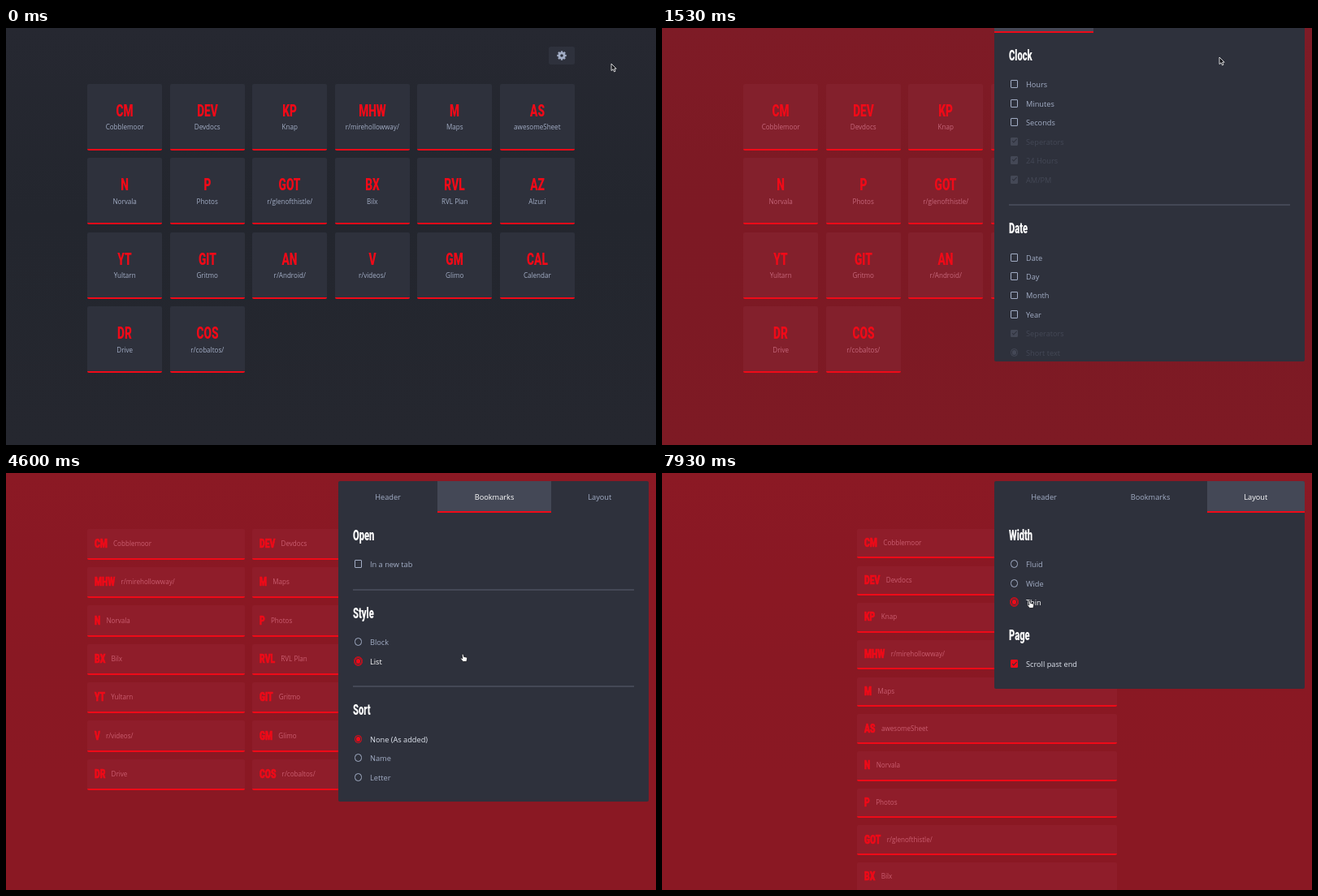
Recreate the animation shown at these times as an HTML page. Size 800 by 514 pixels, loop 8 s.

```html
<!DOCTYPE html>
<html lang="en">
<head>
<meta charset="utf-8">
<title>Start page settings</title>
<style>
:root { --red: #f00a18; --panel: #2e313c; --line: #444856; --text: #a3aec6; }
html, body { margin: 0; width: 100%; height: 100%; overflow: hidden; }
body {
  position: relative; background: linear-gradient(#262831, #23262e 45%, #25272f);
  color: var(--text); font: 9.23px/14px "Open Sans", "Noto Sans", sans-serif; cursor: default;
}
body * { position: absolute; white-space: nowrap; }
#stage { left: 0; top: 0; width: 800px; height: 514px; overflow: hidden; }
.tile { background: var(--panel); border-bottom: 2px solid var(--red); border-radius: 2px; }
.code, h2 { font-family: Roboto, "Liberation Sans", sans-serif; font-weight: 800; }
.code {
  left: 50%; top: 33px; color: var(--red); font-size: 20.5px; line-height: 24px;
  transform: translate(-50%, -50%) scaleX(.67);
}
.label { left: 50%; top: 53.5px; font-size: 8.08px; transform: translate(-50%, -50%); }
.list .code {
  left: 9.2px; top: 50%; font-size: 15.4px; -webkit-text-stroke: .7px var(--red);
  transform-origin: 0 50%; transform: translateY(-50%) scaleX(.67);
}
.list .label { left: var(--after); top: 50%; transform: translateY(-50%); }
#gear { left: 668px; top: 23px; width: 32px; height: 22px; background: var(--panel); border-radius: 2px; }
#gear.hover { background: #383c49; }
#gear svg { left: 10px; top: 5px; }
#shade { inset: 0; background: var(--red); }
#panel { left: 409px; top: 10px; width: 381.5px; background: var(--panel); border-radius: 2px; overflow: hidden; }
.tab { top: 0; height: 39px; line-height: 39px; text-align: center; }
.tab.hover { background: #383c49; color: #fff; }
.tab.on { height: 37px; background: var(--line); color: #fff; border-bottom: 2px solid var(--red); }
.page { inset: 0; }
h2 {
  left: 18px; margin: 0; color: #fff; font-size: 18.6px; line-height: 24px;
  transform-origin: 0 50%; transform: translateY(-50%) scaleX(.6);
}
hr { left: 18px; width: 346px; height: 2px; margin: 0; border: 0; background: var(--line); }
.row { left: 18px; width: 325px; height: 23.4px; line-height: 23.4px; padding-left: 21px; }
.row i { left: 1.5px; top: 6.2px; width: 7.8px; height: 7.8px; border: 1.6px solid currentColor; border-radius: 1px; }
.row.radio i { border-radius: 50%; }
.row.on { color: #dfe4ee; }
.row.hover { color: #fff; }
.row.on i { border-color: var(--red); }
.row.off { color: var(--line); }
.row.off i { border-color: var(--line); }
.row.check.on i { background: var(--red); }
.row.check.off i { background: var(--line); }
.row.check.on i::after, .row.check.off i::after {
  content: ""; position: absolute; left: 1px; top: 1.2px; width: 4.6px; height: 2.2px;
  border: solid var(--panel); border-width: 0 0 1.3px 1.3px; transform: rotate(-45deg);
}
.row.radio.on i::after, .row.radio.off i::after {
  content: ""; position: absolute; inset: 1.1px; border-radius: 50%; background: var(--red);
}
.row.radio.off i::after { background: var(--line); }
.row.radio.on.hover i { outline: 1.5px solid #d00c19; }
#cursor { left: 0; top: 0; overflow: visible; }
</style>
</head>
<body>
<div id="stage">
  <div id="grid"></div>
  <div id="gear">
    <svg width="12" height="12" fill="none" stroke="#a3aec6">
      <circle cx="6" cy="6" r="3.2" stroke-width="2.8"/>
      <circle cx="6" cy="6" r="4.8" stroke-width="1.9" pathLength="96" stroke-dasharray="7 5" stroke-dashoffset="3.5"/>
    </svg>
  </div>
  <div id="shade"></div>
  <div id="panel"></div>
  <svg id="cursor" width="12" height="14">
    <path id="arrow" d="M0 0V8.6L2 6.8L3.5 9.9L5 9.2L3.6 6.2H6.2Z" fill="#15161b" stroke="#fff" stroke-width=".8"/>
    <path id="hand" d="M-1 .6Q0-.6 1 .6L1.5 3.4L5 4.2Q6 4.6 5.7 6L4.8 9.5H.6L-2.6 5.8Q-2.6 4.6-1.2 5.2L-.2 5.8Z"
      fill="#fff" stroke="#15161b" stroke-width=".8"/>
  </svg>
</div>
<script>
const LOOP = 8000, STEP = 23.45;
const OPEN = 1800, TO_BOOKMARKS = 2690, TO_LIST = 4466, TO_LAYOUT = 5640, TO_THIN = 7800;
const $ = id => document.getElementById(id);

function add(parent, tag, cls, text = '') {
  const el = document.createElement(tag);
  el.className = cls;
  el.textContent = text;
  parent.append(el);
  return el;
}
function place(el, x, y, w, h) {
  Object.assign(el.style, { left: x + 'px', top: y + 'px', width: w + 'px', height: h + 'px' });
}

const links = `CM Cobblemoor|DEV Devdocs|KP Knap|MHW r/mirehollowway/|M Maps|AS awesomeSheet|
N Norvala|P Photos|GOT r/glenofthistle/|BX Bilx|RVL RVL Plan|AZ Alzuri|YT Yultarn|GIT Gritmo|
AN r/Android/|V r/videos/|GM Glimo|CAL Calendar|DR Drive|COS r/cobaltos/`;
const tiles = links.split('|').map(item => {
  const [, code, label] = item.trim().match(/^(\S+) (.+)$/);
  const el = add($('grid'), 'div', 'tile');
  return { el, code: add(el, 'span', 'code', code), label: add(el, 'span', 'label', label) };
});

const tabs = [['Header', 0, 122], ['Bookmarks', 122, 140], ['Layout', 262, 119.5]].map(([name, x, w]) => {
  const el = add($('panel'), 'div', 'tab', name);
  el.style.left = x + 'px';
  el.style.width = w + 'px';
  return { el, x: x + 409, w };
});

// Row marks: [] check, () radio, + checked, - disabled; "_" is a rule, "#" a heading
const pages = [
  ['#Clock|[] Hours|[] Minutes|[] Seconds|[]- Seperators|[]- 24 Hours|[]- AM/PM|_|' +
   '#Date|[] Date|[] Day|[] Month|[] Year|[]- Seperators|()- Short text', 443.5],
  ['#Open|[] In a new tab|_|#Style|() Block|() List|_|#Sort|()+ None (As added)|() Name|() Letter', 395],
  ['#Width|() Fluid|() Wide|() Thin|#Page|[]+ Scroll past end', 256]
].map(([spec, height]) => {
  const el = add($('panel'), 'div', 'page'), rows = {};
  let y = 27, last = '_';
  for (const item of spec.split('|')) {
    const kind = item[0];
    if (kind === '#') {
      if (y > 27) y += last === '_' ? 29 : 40;
      else y = 67;
      add(el, 'h2', '', item.slice(1)).style.top = y + 'px';
    } else if (kind === '_') {
      y += 31;
      add(el, 'hr', '').style.top = y - 1 + 'px';
    } else {
      y += last === '#' ? 36 : STEP;
      const [, mark, name] = item.match(/^(\S+) (.+)$/);
      const row = add(el, 'div', 'row ' + (kind === '(' ? 'radio' : 'check'), name);
      add(row, 'i', '');
      row.style.top = y - STEP / 2 + 'px';
      row.classList.toggle('on', mark[2] === '+');
      row.classList.toggle('off', mark[2] === '-');
      rows[name] = { el: row, y: y + 10, off: mark[2] === '-' };
    }
    last = kind;
  }
  return { el, height, rows };
});

const clamp = v => Math.min(1, Math.max(0, v));
const smooth = (t, start, span) => { const p = clamp((t - start) / span); return p * p * (3 - 2 * p); };

// Pointer tip: time, x, y
const track = [
  [0, 745, 44], [70, 745, 44], [900, 686, 36], [1780, 686, 36], [2560, 604, 34], [2720, 604, 34],
  [3400, 488, 185], [3650, 488, 185], [4070, 562, 223], [4640, 562, 223], [5070, 698, 66],
  [5400, 728, 32], [5670, 728, 32], [6400, 670, 122], [7270, 462, 158], [7530, 452, 157], [LOOP, 452, 157]
];
function slope(i, axis) {
  const a = track[i - 1], b = track[i], c = track[i + 1];
  if (!a || !c) return 0;
  const before = (b[axis] - a[axis]) / (b[0] - a[0]), after = (c[axis] - b[axis]) / (c[0] - b[0]);
  return before * after > 0 ? 2 * before * after / (before + after) : 0;
}
function pointer(t, axis) {
  const i = Math.max(0, track.findIndex(k => k[0] > t) - 1);
  const a = track[i], b = track[i + 1], span = b[0] - a[0], p = (t - a[0]) / span, q = 1 - p;
  return q * q * (1 + 2 * p) * a[axis] + p * p * (3 - 2 * p) * b[axis]
    + span * p * q * (q * slope(i, axis) - p * slope(i + 1, axis));
}

let layout = '';
function arrange(cols, left, width, height) {
  const key = [cols, height].join();
  if (key === layout) return;
  layout = key;
  const gap = 9.2, w = (width - gap * (cols - 1)) / cols;
  $('grid').className = cols < 6 ? 'list' : '';
  tiles.forEach(({ el, code, label }, i) => {
    place(el, left + i % cols * (w + gap), 68.8 + Math.floor(i / cols) * (height + gap), w, height - 2);
    label.style.setProperty('--after', 16.2 + code.getBoundingClientRect().width + 'px');
  });
}

function render(t) {
  const x = pointer(t, 1), y = pointer(t, 2);
  const current = t < TO_BOOKMARKS ? 0 : t < TO_LAYOUT ? 1 : 2;

  if (t < TO_LIST) arrange(6, 100, 600, 82.2);
  else {
    const left = 1 - clamp((t - TO_LIST) / 182);
    const height = 36.5 + 45.7 * left ** 2.5;
    if (t < TO_THIN) arrange(3, 100, 600, height);
    else arrange(1, 240.3, 319.4, height);
  }

  $('shade').style.opacity = smooth(t, 1148, 486) / 2;
  $('panel').style.transform = `translateY(${-454 * (1 - smooth(t, 1117, 510))}px)`;
  $('panel').style.height = pages[current].height + 'px';
  $('gear').classList.toggle('hover', t < 1200 && x > 668 && x < 700 && y > 23 && y < 45);

  tabs.forEach(({ el, x: left, w }, i) => {
    el.classList.toggle('on', i === current);
    el.classList.toggle('hover', t > OPEN && y > 10 && y < 49 && x > left && x < left + w);
  });

  const { Block, List } = pages[1].rows, { Wide, Thin } = pages[2].rows;
  Block.el.classList.toggle('on', t < TO_LIST);
  List.el.classList.toggle('on', t >= TO_LIST);
  Wide.el.classList.toggle('on', t < TO_THIN);
  Thin.el.classList.toggle('on', t >= TO_THIN);

  let over = false;
  pages.forEach(({ el, rows }, i) => {
    el.style.display = i === current ? '' : 'none';
    for (const row of Object.values(rows)) {
      const hit = i === current && t > OPEN && !row.off
        && Math.abs(y - row.y) < STEP / 2 && x > 427 && x < 773;
      row.el.classList.toggle('hover', hit);
      over = over || hit;
    }
  });
  $('cursor').style.transform = `translate(${x}px, ${y}px)`;
  $('arrow').style.display = over ? 'none' : '';
  $('hand').style.display = over ? '' : 'none';
}

let start;
function frame(now) {
  start ??= now;
  render((now - start) % LOOP);
  requestAnimationFrame(frame);
}
render(0);
requestAnimationFrame(frame);
</script>
</body>
</html>
```
